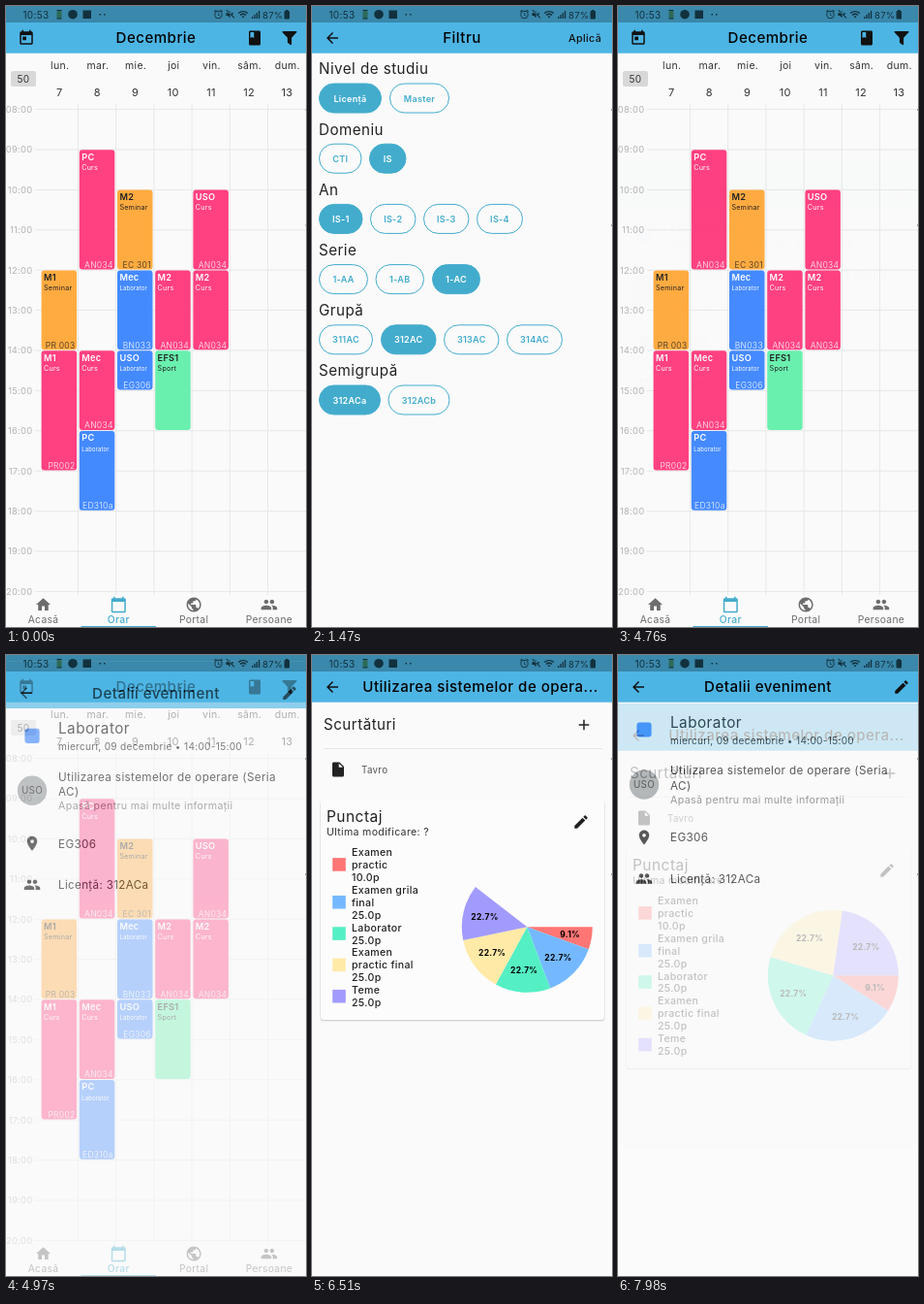
Write an HTML page that moves like this. It is 310 px wide and 640 px high and loops after 8000 ms.

```html
<!DOCTYPE html>
<html lang="ro">
<head>
<meta charset="utf-8">
<style>
html, body { margin: 0; width: 100%; height: 100%; overflow: hidden; background: #fafafa; }
svg { display: block; width: 310px; height: 640px; }
text { font-family: Inter, sans-serif; letter-spacing: .03em; white-space: pre; }
</style>
</head>
<body>
<svg id="stage" viewBox="0 0 310 640"></svg>
<script>
const BLUE = '#43accd', INK = '#222', LOOP = 8000;
const PINK = '#ff4081', ORANGE = '#ffab40', SKY = '#448aff', GREEN = '#69f0ae';

const icons = {
  today: 'M19 3h-1V1h-2v2H8V1H6v2H5c-1.1 0-2 .9-2 2v14c0 1.1.9 2 2 2h14c1.1 0 2-.9 2-2V5c0-1.1-.9-2-2-2zm0 16H5V8h14v11zM7 10h5v5H7z',
  book: 'M18 2H6c-1.1 0-2 .9-2 2v16c0 1.1.9 2 2 2h12c1.1 0 2-.9 2-2V4c0-1.1-.9-2-2-2zM6 4h5v8l-2.5-1.5L6 12V4z',
  filter: 'M3 2.5h18c1 0 1.4 1.1.7 1.8L14.8 11.6v9c0 .9-.9 1.3-1.6.8L10 19c-.5-.4-.8-.8-.8-1.4v-6L2.3 4.3C1.6 3.6 2 2.5 3 2.5z',
  home: 'M10 20v-6h4v6h5v-8h3L12 3 2 12h3v8z',
  calendar: 'M20 3h-1V1h-2v2H7V1H5v2H4c-1.1 0-2 .9-2 2v16c0 1.1.9 2 2 2h16c1.1 0 2-.9 2-2V5c0-1.1-.9-2-2-2zm0 18H4V8h16v13z',
  globe: 'M12 2C6.48 2 2 6.48 2 12s4.48 10 10 10 10-4.48 10-10S17.52 2 12 2zm-1 17.93c-3.95-.49-7-3.85-7-7.93 0-.62.08-1.21.21-1.79L9 15v1c0 1.1.9 2 2 2v1.93zm6.9-2.54c-.26-.81-1-1.39-1.9-1.39h-1v-3c0-.55-.45-1-1-1H8v-2h2c.55 0 1-.45 1-1V7h2c1.1 0 2-.9 2-2v-.41c2.93 1.19 5 4.06 5 7.41 0 2.08-.8 3.97-2.1 5.39z',
  people: 'M16 11c1.66 0 3-1.34 3-3s-1.34-3-3-3-3 1.34-3 3 1.34 3 3 3zm-8 0c1.66 0 3-1.34 3-3S9.66 5 8 5 5 6.34 5 8s1.34 3 3 3zm0 2c-2.33 0-7 1.17-7 3.5V19h14v-2.5c0-2.33-4.67-3.5-7-3.5zm8 0c-.29 0-.62.02-.97.05 1.16.84 1.97 1.97 1.97 3.45V19h6v-2.5c0-2.33-4.67-3.5-7-3.5z',
  back: 'M20 11H7.83l5.59-5.59L12 4l-8 8 8 8 1.41-1.41L7.83 13H20v-2z',
  edit: 'M3 17.25V21h3.75L17.81 9.94l-3.75-3.75L3 17.25zM20.71 7.04c.39-.39.39-1.02 0-1.41l-2.34-2.34c-.39-.39-1.02-.39-1.41 0l-1.83 1.83 3.75 3.75 1.83-1.83z',
  place: 'M12 2C8.13 2 5 5.13 5 9c0 5.25 7 13 7 13s7-7.75 7-13c0-3.87-3.13-7-7-7zm0 9.5c-1.38 0-2.5-1.12-2.5-2.5s1.12-2.5 2.5-2.5 2.5 1.12 2.5 2.5-1.12 2.5-2.5 2.5z',
  file: 'M6 2c-1.1 0-2 .9-2 2v16c0 1.1.9 2 2 2h12c1.1 0 2-.9 2-2V8l-6-6H6zm7 7V3.5L18.5 9H13z',
  add: 'M19 13h-6v6h-2v-6H5v-2h6V5h2v6h6v2z',
  alarm: 'M22 5.7l-4.6-3.9-1.3 1.6 4.6 3.8zM7.9 3.4L6.6 1.9 2 5.7l1.3 1.5zM12.5 8H11v6l4.8 2.9.7-1.3-4-2.4zM12 4a9 9 0 1 0 0 18 9 9 0 0 0 0-18zm0 16a7 7 0 1 1 0-14 7 7 0 0 1 0 14z',
  mute: 'M3 9v6h4l5 5V4L7 9zM3 3l1.5-1.5 18 18L21 21zM15 8l5 2-3 5z',
  wifi: 'M1 9l2 2c5-5 13-5 18 0l2-2C17 3 7 3 1 9zm8 8l3 3 3-3c-1.6-1.7-4.4-1.7-6 0zm-4-4l2 2c2.8-2.8 7.2-2.8 10 0l2-2C15 9 9 9 5 13z'
};

const text = (s, x, y, size, fill = INK, weight = 400, anchor = 'start') =>
  `<text x="${x}" y="${y}" font-size="${size}" fill="${fill}" font-weight="${weight}" text-anchor="${anchor}">${s}</text>`;
const centered = (s, x, y, size, fill, weight) => text(s, x, y, size, fill, weight, 'middle');
const rect = (x, y, w, h, fill, r = 0, extra = '') =>
  `<rect x="${x}" y="${y}" width="${w}" height="${h}" fill="${fill}" rx="${r}" ${extra}/>`;
const icon = (name, cx, cy, fill = INK, size = 18) =>
  `<path transform="translate(${cx - size / 2} ${cy - size / 2}) scale(${size / 24})" fill="${fill}" d="${icons[name]}"/>`;
const each = (list, draw) => list.map(draw).join('');
const appBar = (title, x = 155) =>
  rect(0, 0, 310, 640, '#fafafa') + rect(0, 0, 310, 48.7, '#4db5e4') + centered(title, x, 38.3, 15.1, '#000', 500);

function calendarPage() {
  const colX = day => 37 + 39.2 * day, hourY = hour => 106.6 + 41.4 * (hour - 8);
  const days = ['lun.', 'mar.', 'mie.', 'joi', 'vin.', 'sâm.', 'dum.'];
  const hours = Array.from({ length: 13 }, (_, i) => i + 8);
  // day, start, end, colour, subject, kind, room
  const events = [
    [0, 12, 14, ORANGE, 'M1', 'Seminar', 'PR 003'],
    [0, 14, 17, PINK, 'M1', 'Curs', 'PR002'],
    [1, 9, 12, PINK, 'PC', 'Curs', 'AN034'],
    [1, 14, 16, PINK, 'Mec', 'Curs', 'AN034'],
    [1, 16, 18, SKY, 'PC', 'Laborator', 'ED310a'],
    [2, 10, 12, ORANGE, 'M2', 'Seminar', 'EC 301'],
    [2, 12, 14, SKY, 'Mec', 'Laborator', 'BN033'],
    [2, 14, 15, SKY, 'USO', 'Laborator', 'EG306'],
    [3, 12, 14, PINK, 'M2', 'Curs', 'AN034'],
    [3, 14, 16, GREEN, 'EFS1', 'Sport', ''],
    [4, 10, 12, PINK, 'USO', 'Curs', 'AN034'],
    [4, 12, 14, PINK, 'M2', 'Curs', 'AN034']
  ];
  const event = ([day, start, end, color, subject, kind, room]) => {
    const x = colX(day), top = hourY(start), bottom = hourY(end);
    const ink = color === PINK || color === SKY ? '#fff' : INK;
    return rect(x - .4, top + .2, 36.5, bottom - top - 1, color, 3) +
      text(subject, x + 2, top + 10.6, 9.2, ink, 600) +
      text(kind, x + 2, top + 21, kind === 'Laborator' ? 5.9 : 7.2, ink) +
      `<g opacity=".75">${text(room, x + 34.5, bottom - 2.5, 8.5, ink, 400, 'end')}</g>`;
  };
  const tabs = [['home', 'Acasă'], ['calendar', 'Orar'], ['globe', 'Portal'], ['people', 'Persoane']];
  return appBar('Decembrie') +
    icon('today', 21, 33, '#111') + icon('book', 257, 33, '#111') + icon('filter', 293, 33, '#111') +
    rect(5, 67, 26, 16, '#d8d8d8', 2) + centered('50', 18, 79, 10, '#333') +
    each(days, (d, i) => centered(d, 55.7 + 39.2 * i, 64.5, 10.5, '#333') + centered(i + 7, 55.2 + 39.2 * i, 93, 11, '#333')) +
    each(hours, h => rect(30, hourY(h) - .5, 280, 1, '#e8e8e8') +
      text(String(h).padStart(2, '0') + ':00', 27.5, hourY(h) + 3.4, 9.4, '#b4b4b4', 400, 'end')) +
    each([1, 2, 3, 4, 5, 6], i => rect(colX(i) - 2.2, 101, 1, 506, '#e8e8e8')) +
    each(events, event) +
    rect(0, 607, 310, 33, '#fafafa') +
    each(tabs, ([name, label], i) => {
      const x = 38.5 + 77.8 * i, active = i === 1, color = active ? BLUE : '#6c6c6c';
      return icon(name, x, 617, color) + centered(label, x, 636.3, 10.3, color, active ? 500 : 400);
    }) +
    rect(77.5, 639, 77.5, 1, BLUE);
}

function filterPage() {
  // heading, selected chip, then label / left / right
  const rows = [
    ['Nivel de studiu', 0, ['Licență', 7, 72], ['Master', 80, 142]],
    ['Domeniu', 1, ['CTI', 7, 51.5], ['IS', 59, 97.5]],
    ['An', 0, ['IS-1', 7, 52.5], ['IS-2', 60, 107.5], ['IS-3', 115, 162.5], ['IS-4', 170, 218]],
    ['Serie', 2, ['1-AA', 7, 58], ['1-AB', 65.5, 116], ['1-AC', 124, 174]],
    ['Grupă', 1, ['311AC', 7, 63], ['312AC', 71, 128.5], ['313AC', 136, 193.5], ['314AC', 201, 259]],
    ['Semigrupă', 0, ['312ACa', 7, 71], ['312ACb', 78.5, 142.5]]
  ];
  return appBar('Filtru') + icon('back', 21, 33, '#111') + text('Aplică', 265, 36.8, 10.8, '#111', 500) +
    each(rows, ([heading, selected, ...chips], row) => {
      const y = 62.2 * row;
      return text(heading, 7, 70.3 + y, 15.2) + each(chips, ([label, left, right], i) =>
        rect(left + .5, 80 + y, right - left - 1, 30, i === selected ? BLUE : 'none', 15, `stroke="${BLUE}"`) +
        centered(label, (left + right) / 2, 98.5 + y, 9.1, i === selected ? '#fff' : BLUE, 600));
    });
}

function eventPage() {
  return appBar('Detalii eveniment') + icon('back', 21, 33, '#111') + icon('edit', 293, 33, '#111') +
    rect(19.4, 69.4, 15.2, 15.2, SKY, 3) + text('Laborator', 54, 75, 15.3) +
    text('miercuri, 09 decembrie • 14:00-15:00', 54, 92, 10.1, '#333') +
    '<circle cx="27" cy="133.5" r="15.2" fill="#9da1a3"/>' + centered('USO', 27, 137, 9.8) +
    text('Utilizarea sistemelor de operare (Seria', 54, 123.3, 11.7) + text('AC)', 54, 138.5, 11.7) +
    text('Apasă pentru mai multe informații', 54, 153, 10.7, '#7b7b7b') +
    icon('place', 27, 188) + text('EG306', 54, 192.3, 11.7) +
    icon('people', 27, 230.5) + text('Licență: 312ACa', 54, 235, 11.6);
}

const scores = [
  ['#ff7675', 10, 'Examen', 'practic'],
  ['#74b9ff', 25, 'Examen grila', 'final'],
  ['#55efc4', 25, 'Laborator'],
  ['#ffeaa7', 25, 'Examen', 'practic final'],
  ['#a29bfe', 25, 'Teme']
];
const total = scores.reduce((sum, s) => sum + s[1], 0);

function coursePage() {
  let line = 0;
  const legend = each(scores, ([color, points, ...label]) => {
    const lines = [...label, points.toFixed(1) + 'p'], first = 207 + 12.93 * line;
    line += lines.length;
    return rect(21.2, first - 10.8 + 6.47 * (lines.length - 1), 13.6, 13.6, color) +
      each(lines, (s, i) => text(s, 41, first + 12.93 * i, 10.6, INK, 500));
  });
  return appBar('Utilizarea sistemelor de opera...', 174) + icon('back', 21, 33, '#111') +
    text('Scurtături', 12, 77.3, 15.2) + icon('add', 281, 72) + rect(12, 96, 288, 1, '#e6e6e6') +
    icon('file', 27, 118) + text('Tavro', 51, 121.6, 9.8, '#555') +
    rect(8.5, 150, 294, 228, '#000', 4, 'opacity=".06"') + rect(8.5, 149.5, 294, 227.5, '#000', 3.5, 'opacity=".1"') +
    rect(9, 149, 293, 227, '#fcfcfc', 3) +
    text('Punctaj', 15, 171.6, 15.5) + text('Ultima modificare: ?', 15, 185.6, 10.6, '#333') +
    icon('edit', 278, 172) + legend + '<g id="pie"></g>';
}

function pieSlices(growth) {
  const cx = 222.3, cy = 280.3, r = 67.5;
  let angle = 0;
  return each(scores, ([color, points]) => {
    const sweep = 2 * Math.PI * growth * points / total, end = angle + sweep, mid = angle + sweep / 2;
    const at = (a, d) => `${cx + d * Math.cos(a)} ${cy + d * Math.sin(a)}`;
    const slice = `<path fill="${color}" d="M${cx} ${cy}L${at(angle, r)}A${r} ${r} 0 0 1 ${at(end, r)}z"/>`;
    angle = end;
    return slice + centered((100 * points / total).toFixed(1) + '%',
      cx + r / 1.5 * Math.cos(mid), cy + r / 1.5 * Math.sin(mid) + 3, 8.5, '#000', 700);
  });
}

function statusBar() {
  const ink = '#12313e';
  return rect(0, 0, 310, 17, '#000', 0, 'opacity=".25"') +
    text('10:53', 17.5, 12.5, 10, ink) +
    rect(52.5, 5, 5, 8, '#2c6a58', 1) + rect(52.5, 4, 5, 1, ink) + rect(52.5, 12.5, 5, 1, ink) +
    `<circle cx="69" cy="8.7" r="4.8" fill="${ink}"/>` + rect(79.5, 4.5, 8.5, 8.5, ink) +
    rect(96.5, 8, 1.5, 1.5, ink) + rect(101, 8, 1.5, 1.5, ink) +
    icon('alarm', 219.5, 8.5, ink, 11) + icon('mute', 231.5, 8.5, ink, 11) + icon('wifi', 245, 8.5, ink, 11.5) +
    each([2, 4, 6, 8], (h, i) => rect(254 + 2.3 * i, 13 - h, 1.3, h, ink)) +
    text('87%', 265, 12.5, 9.5, ink) + rect(287.5, 5, 5.5, 8.5, ink, 1) + rect(289, 4, 2.5, 1.5, ink);
}

function bezier(x1, y1, x2, y2) {
  const curve = (a, b, s) => 3 * (1 - s) * (1 - s) * s * a + 3 * (1 - s) * s * s * b + s ** 3;
  return x => {
    let lo = 0, hi = 1;
    for (let i = 0; i < 24; i++) {
      const s = (lo + hi) / 2;
      if (curve(x1, x2, s) < x) lo = s; else hi = s;
    }
    return curve(y1, y2, lo);
  };
}
const slide = bezier(.4, 0, .2, 1), fade = bezier(.42, 0, 1, 1);
const progress = (t, start, duration) => Math.min(1, Math.max(0, (t - start) / duration));

// Pages pushed above the calendar, with their open and close times
const routes = [
  { id: 'filter', draw: filterPage, open: 825, close: 2735 },
  { id: 'event', draw: eventPage, open: 4745, close: Infinity },
  { id: 'course', draw: coursePage, open: 6150, close: 7813 }
];
const stage = document.getElementById('stage');
stage.innerHTML = calendarPage() + each(routes, r => `<g id="${r.id}">${r.draw()}</g>`) + statusBar() +
  `<g id="edge">${rect(309, 106, 1, 2, '#aaa')}${rect(309, 225, 1, 2, '#aaa')}</g>`;
const part = id => document.getElementById(id);

function frame(now) {
  const t = now % LOOP;
  for (const { id, open, close } of routes) {
    const p = progress(t, open, 300) - progress(t, close, 300), page = part(id);
    page.setAttribute('display', p > 0 ? 'inline' : 'none');
    page.setAttribute('opacity', p < 1 ? fade(p) : 1);
    page.setAttribute('transform', `translate(0 ${p < 1 ? 160 * (1 - slide(p)) : 0})`);
  }
  part('pie').innerHTML = pieSlices(1 - (1 - progress(t, 6214, 800)) ** 2);
  part('edge').setAttribute('opacity', t % 560 < 70 ? .6 : 1);
  requestAnimationFrame(frame);
}
frame(performance.now());
</script>
</body>
</html>
```
